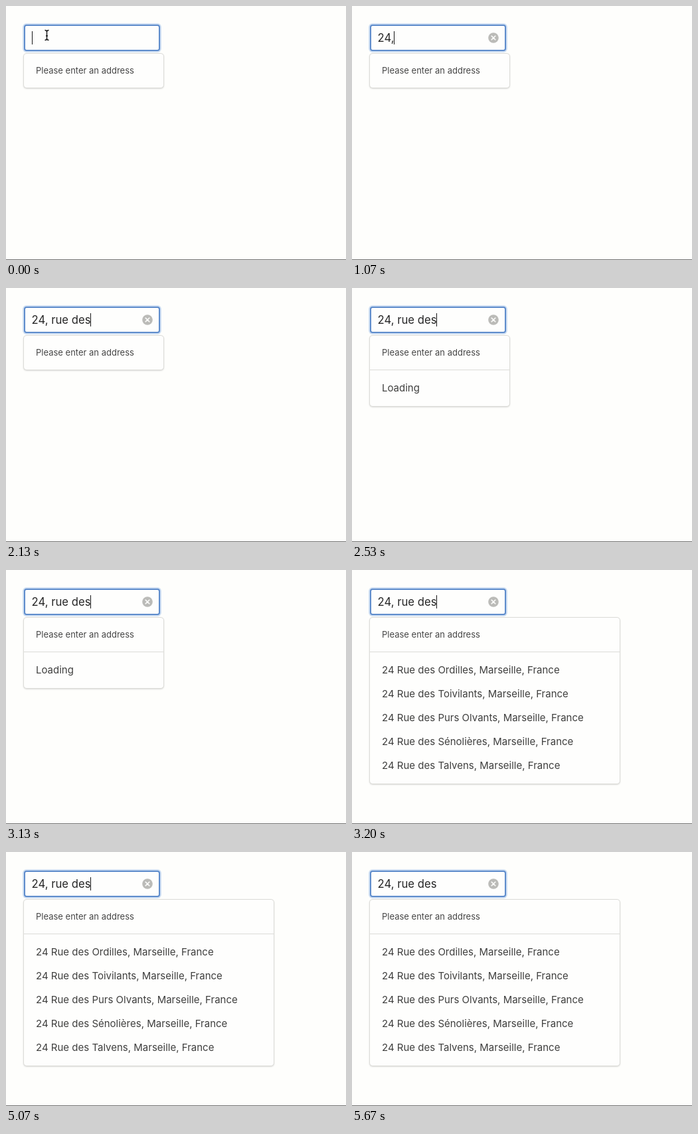
Animation, 512 px wide and 383 px high, one loop 5790 ms. Source, as an HTML page:

```html
<!DOCTYPE html>
<html lang="en">
<head>
<meta charset="utf-8">
<title>Address search</title>
<style>
  html, body { margin: 0; width: 100%; height: 100%; overflow: hidden; }
  body {
    position: relative;
    background: #fefefc;
    color: #3f3f3e;
    font-family: Inter, "Open Sans", sans-serif;
    cursor: default;
  }
  .edge {
    position: absolute; left: 0; top: 382px; width: 512px; height: 1px;
    background: #707070;
  }
  .field {
    position: absolute; left: 27px; top: 28px; width: 205px; height: 40px;
    box-sizing: border-box;
    border: 2px solid #5d8bcb; border-radius: 4px;
    background: #fefefd;
    box-shadow: 0 0 0 2px #cfdff3;
  }
  .value {
    position: absolute; left: 38.5px; top: 38px; height: 20px;
    display: flex; align-items: center;
    font-size: 16.7px; line-height: 20px; white-space: pre; color: #262626;
  }
  .caret { width: 1px; height: 20px; background: #161616; }
  svg { position: absolute; overflow: visible; }
  .clear { left: 205px; top: 40px; }
  .beam { left: 56px; top: 35px; }
  .menu {
    position: absolute; left: 26px; top: 71px; width: 212px; height: 53px;
    box-sizing: border-box; overflow: hidden;
    border: 1px solid #dcdcd8; border-radius: 5px;
    background: #fefefd;
    box-shadow: 0 1px 2px rgba(80, 80, 80, .2);
  }
  .menu.loading { height: 108px; }
  .menu.results { width: 378px; height: 252px; }
  .hint, .row { position: absolute; left: 18px; white-space: nowrap; }
  .hint { top: 15px; font-size: 13px; line-height: 20px; color: #464646; }
  .rule {
    position: absolute; left: 0; right: 0; top: 51px; height: 1px;
    background: #dcdcd8;
  }
  .row { font-size: 15px; line-height: 20px; }
</style>
</head>
<body>
  <div class="field"></div>
  <div class="value"><span id="text"></span><i class="caret" id="caret"></i></div>

  <svg class="clear" id="clear" width="16" height="16">
    <circle cx="8" cy="8" r="7.8" fill="#bbbbb8"/>
    <path d="M5.2 5.2 10.8 10.8M10.8 5.2 5.2 10.8" stroke="#fefefc" stroke-width="1.6" stroke-linecap="round"/>
  </svg>

  <div class="menu" id="menu">
    <div class="hint">Please enter an address</div>
    <div class="rule" id="rule"></div>
    <div id="list"></div>
  </div>

  <svg class="beam" id="beam" width="12" height="18" fill="none">
    <defs>
      <path id="shape" d="M2.5 1.5Q5.5 1.5 5.5 4V14Q5.5 16.5 2.5 16.5M8.5 1.5Q5.5 1.5 5.5 4M5.5 14Q5.5 16.5 8.5 16.5M4 10H7"/>
    </defs>
    <use href="#shape" stroke="#fff" stroke-width="3"/>
    <use href="#shape" stroke="#151515" stroke-width="1.4"/>
  </svg>

  <div class="edge"></div>

<script>
  const LOOP = 5790;
  const QUERY = "24, rue des";
  const KEYS = [530, 870, 1070, 1330, 1600, 1730, 1800, 1870, 1930, 2070, 2130];
  const POINTER_GONE = 70, LOADING = 2200, RESULTS = 3200;
  const BLINKS = [[2670, 3070], [3670, 4070], [4670, 5070], [5670, LOOP]];
  const STREETS = ["Ordilles", "Toivilants", "Purs Olvants", "Sénolières", "Talvens"];

  const $ = id => document.getElementById(id);
  const [text, caret, clear, menu, rule, list, beam] =
    ["text", "caret", "clear", "menu", "rule", "list", "beam"].map($);

  const show = (el, on) => { el.style.display = on ? "" : "none"; };

  const row = (label, i) => `<div class="row" style="top:${69 + 36 * i}px">${label}</div>`;

  const rows = {
    "": "",
    loading: row("Loading", 0),
    results: STREETS.map((s, i) => row(`24 Rue des ${s}, Marseille, France`, i)).join("")
  };

  let last = null;

  function setMenu(state) {
    if (state === last) return;
    last = state;
    menu.className = "menu " + state;
    list.innerHTML = rows[state];
    show(rule, state !== "");
  }

  function draw(now) {
    const t = now % LOOP;
    const typed = KEYS.filter(k => t >= k).length;
    text.textContent = QUERY.slice(0, typed);
    show(clear, typed > 0);
    show(beam, t < POINTER_GONE);
    show(caret, !BLINKS.some(([off, on]) => t >= off && t < on));
    setMenu(t < LOADING ? "" : t < RESULTS ? "loading" : "results");
  }

  let start;
  function tick(now) {
    start ??= now;
    draw(Math.max(0, now - start));
    requestAnimationFrame(tick);
  }
  draw(0);
  requestAnimationFrame(tick);
</script>
</body>
</html>
```
